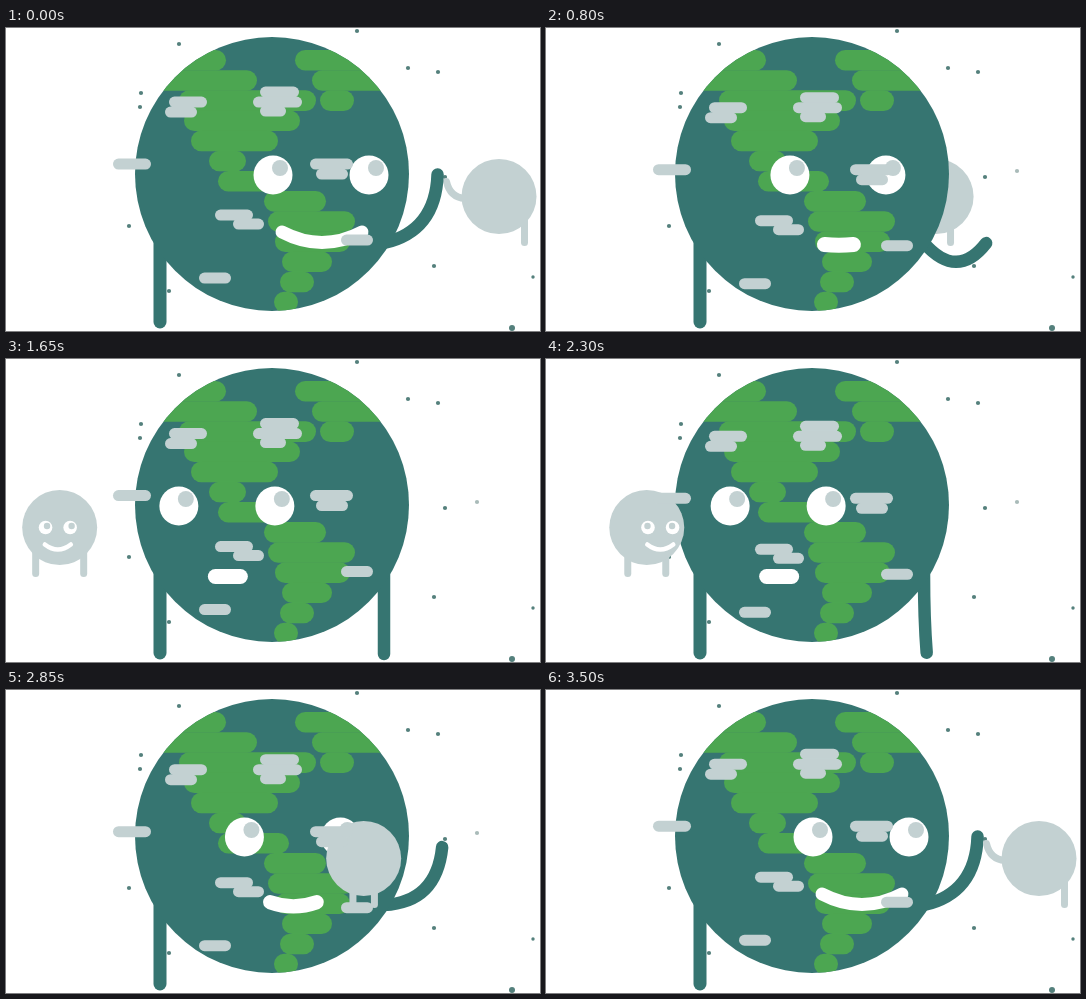
Animation, 534 px wide and 303 px high, one loop 3.55 s. Source, as an HTML page with a canvas:

```html
<!DOCTYPE html>
<html lang="en">
<head>
<meta charset="utf-8">
<title>Earth and Moon</title>
<style>
  html, body { margin: 0; width: 100%; height: 100%; overflow: hidden; background: #fff; }
  canvas { display: block; width: 534px; height: 303px; }
</style>
</head>
<body>
<canvas id="stage" width="534" height="303"></canvas>
<script>
const ctx = document.getElementById('stage').getContext('2d');
const LOOP = 3550, STEP = 50;
const SEA = '#367571', LAND = '#4ca651', GREY = '#c3d1d2', WHITE = '#fff';
const EARTH = { x: 266, y: 146, r: 137 };

// [left, right] of each land strip, 20.3px tall, from the top down
const AMERICAS = [[120, 220], [120, 251], [173, 310], [178, 294], [185, 272], [203, 240],
  [212, 283], [258, 320], [262, 349], [269, 344], [276, 326], [274, 308], [268, 292]];
const EAST = [[289, 420], [306, 420], [314, 348]];
// left, right, centre height
const CLOUDS = [[163, 201, 74], [159, 191, 84], [254, 293, 64], [247, 296, 74], [254, 280, 83],
  [107, 145, 136], [304, 347, 136], [310, 342, 146], [209, 247, 187], [227, 258, 196],
  [335, 367, 212], [193, 225, 250]];
const STARS = [[173, 16], [351, 3], [402, 40], [432, 44], [135, 65], [134, 79], [123, 198],
  [163, 263], [439, 149], [471, 143], [428, 238], [527, 249], [506, 300]];

const clamp = v => Math.max(0, Math.min(1, v));
const mix = (a, b, k) => a + (b - a) * k;
const ramp = (t, from, to) => clamp((t - from) / (to - from));
const ease = p => p * p * (3 - 2 * p);
// 1 at rest, eased to 0 and back again
const swing = (t, a, b, c, d) => t < c ? 1 - ease(ramp(t, a, b)) : ease(ramp(t, c, d));

function disc(x, y, r, color, squash = 1) {
  ctx.fillStyle = color;
  ctx.beginPath();
  ctx.ellipse(x, y, r, r * squash, 0, 0, Math.PI * 2);
  ctx.fill();
}

function pill(left, right, y, height, color) {
  ctx.fillStyle = color;
  ctx.beginPath();
  ctx.roundRect(left, y - height / 2, right - left, height, height / 2);
  ctx.fill();
}

function curve(x0, y0, cx, cy, x1, y1, width, color) {
  ctx.strokeStyle = color;
  ctx.lineWidth = width;
  ctx.lineCap = 'round';
  ctx.beginPath();
  ctx.moveTo(x0, y0);
  ctx.quadraticCurveTo(cx, cy, x1, y1);
  ctx.stroke();
}

function clipDisc(x, y, r) {
  ctx.beginPath();
  ctx.arc(x, y, r, 0, Math.PI * 2);
  ctx.clip();
}

function drawStars() {
  STARS.forEach(([x, y], i) => disc(x, y, i === 12 ? 3 : i > 10 ? 1.7 : 2.1, i === 9 ? '#a9bbb9' : '#54807c'));
}

function drawLand() {
  ctx.save();
  clipDisc(EARTH.x, EARTH.y, EARTH.r);
  for (const strips of [AMERICAS, EAST]) {
    strips.forEach(([left, right], i) => pill(left, right, 32.3 + i * 20.15, 20.6, LAND));
  }
  ctx.restore();
}

function drawArms(t) {
  curve(154, 205, 154, 250, 154, 294, 13, SEA);
  const raise = swing(t, 450, 1303, 2252, 2944);
  const reach = 80 + 7 * raise - 96 * raise * (1 - raise);
  const hand = raise * 142 * Math.PI / 180;
  const elbow = raise * raise * 103 * Math.PI / 180;
  const bend = 45 + 8 * raise;
  curve(378, 215,
    378 + bend * Math.sin(elbow), 215 + bend * Math.cos(elbow),
    378 + reach * Math.sin(hand), 215 + reach * Math.cos(hand), 12.5, SEA);
}

function drawFace(t) {
  const x = mix(171, 267, swing(t, 347, 1767, 1985, 3340));
  const squint = 1 - 0.13 * clamp(1 - Math.abs(t - 1200) / 90);
  for (const eyeX of [x, x + 96]) {
    disc(eyeX, 166.5 - 19.5 * squint, 19.5, WHITE, squint);
    disc(eyeX + 7, 140, 8, GREY);
  }
  const smile = swing(t, 300, 900, 2550, 3250);
  const mouth = x + 49, half = mix(12.5, 40, smile);
  const corner = mix(217.5, 204, smile);
  curve(mouth - half, corner, mouth, mix(217.5, 225, smile), mouth + half, corner, mix(15, 13, smile), WHITE);
}

function drawMoon(t) {
  const leaving = t < 1900;
  const turn = leaving ? 1 - ramp(t, 350, 1810) : ramp(t, 1985, 3340);
  const x = mix(38.5, 493, ease(turn)), y = 168.5;
  const spread = 25.5 * Math.abs(Math.cos(turn * Math.PI));
  const lift = swing(t, 350, 750, 2950, 3340);

  curve(x + spread, y + 24, x + spread, y + 36, x + spread, y + 46, 7, GREY);
  curve(x + mix(-spread, -34, lift), y + mix(24, 2, lift),
    x + mix(-spread, -49, lift), y + mix(36, 1, lift),
    x + mix(-spread, -52.5, lift), y + mix(46, -15, lift), 7, GREY);
  disc(x, y, 37.5, GREY);

  const shift = leaving ? -8 * turn - 80 * turn * turn : 40 * turn + 78 * turn * turn;
  if (Math.abs(shift) > 56) return;
  ctx.save();
  clipDisc(x, y, 37.5);
  for (const side of [-1, 1]) {
    const eyeX = x + shift + side * 12.3;
    disc(eyeX, y, 6.8, WHITE);
    disc(eyeX + (leaving ? 1.5 : -0.5), y - 1.5, 3.2, GREY);
  }
  curve(x + shift - 13, y + 17, x + shift, y + 27, x + shift + 13, y + 17, 4.5, WHITE);
  ctx.restore();
}

function drawClouds(t) {
  const drift = 3 - 3 * Math.cos((t - 50) / LOOP * 4 * Math.PI);
  for (const [left, right, y] of CLOUDS) pill(left, right, y + drift, 11, GREY);
}

function draw(t) {
  ctx.fillStyle = WHITE;
  ctx.fillRect(0, 0, 534, 303);
  drawStars();
  const behind = t < 1900;
  if (behind) drawMoon(t);
  drawArms(t);
  disc(EARTH.x, EARTH.y, EARTH.r, SEA);
  drawLand();
  drawFace(t);
  if (!behind) drawMoon(t);
  drawClouds(t);
}

const start = performance.now();
function tick() {
  const t = (performance.now() - start) % LOOP;
  draw(Math.floor(t / STEP) * STEP);
  requestAnimationFrame(tick);
}
tick();
</script>
</body>
</html>
```
